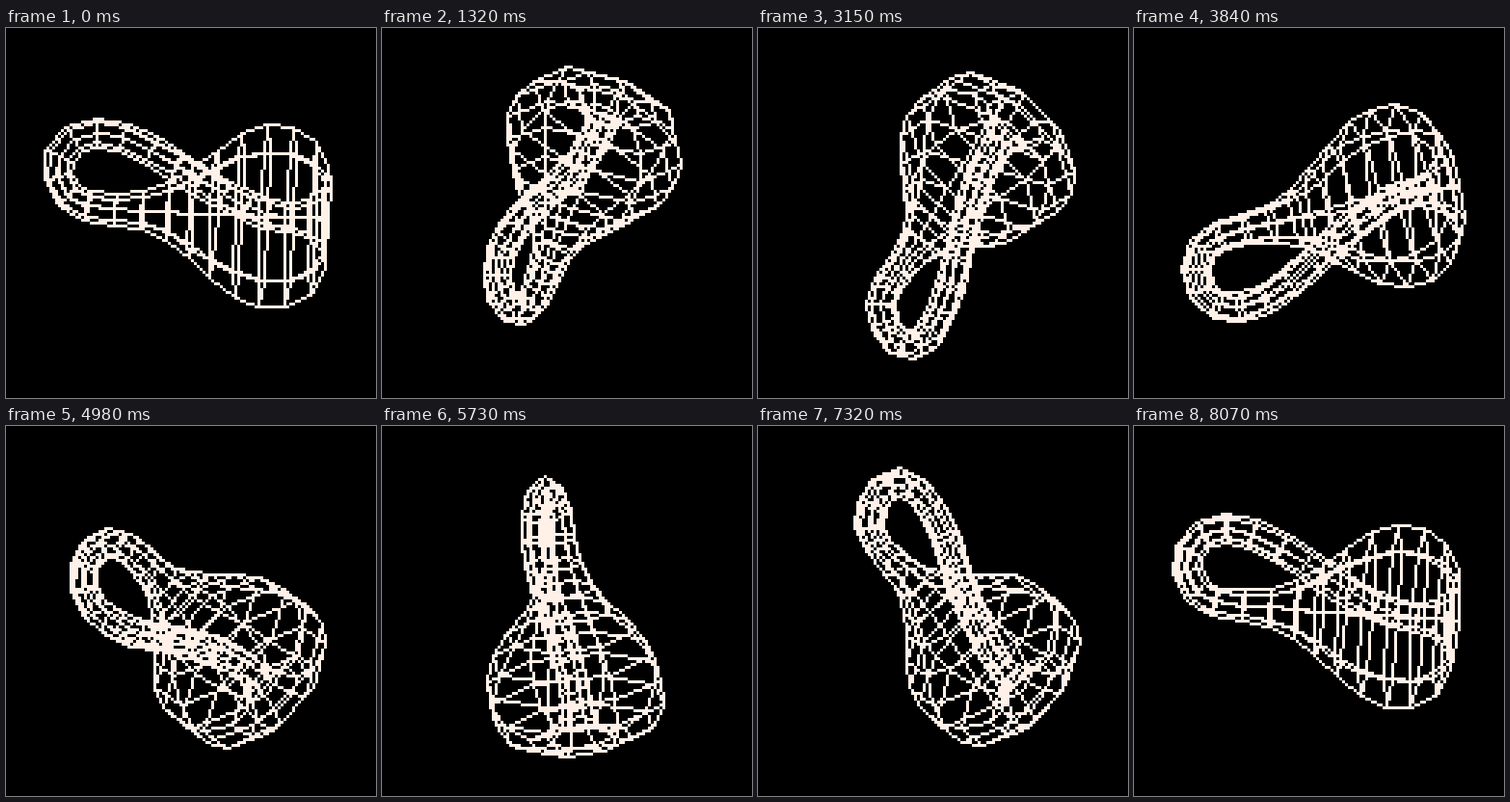
Animation of 384 by 384 pixels, one loop 8100 ms. Source, as an HTML page with a canvas:

```html
<!DOCTYPE html>
<html lang="en">
<head>
<meta charset="utf-8">
<title>Klein bottle</title>
<style>
html, body { margin: 0; width: 100%; height: 100%; overflow: hidden; background: #000; }
canvas { display: block; width: 384px; height: 384px; }
</style>
</head>
<body>
<canvas id="stage" width="384" height="384"></canvas>
<script>
const ctx = document.getElementById('stage').getContext('2d');
const CELL = 3, MID = 64, SIDES = 8;
const STEP = 30, STEPS = 270;

// Rings along the tube: x and y of the centre, radius.
const rings = [
  [138, 0, 34], [122, 0, 20], [103, 0, 15],
  [80, 3, 15], [58, 10, 15], [33, 21, 15], [8, 34, 15], [-17, 48, 15],
  [-44, 63, 15], [-74, 75, 15], [-102, 79, 15], [-125, 71, 15],
  [-139, 53, 15], [-140, 31, 15], [-128, 11, 15], [-108, 2, 15],
  [-79, 0, 16], [-51, 0, 20], [-24, 0, 31], [0, 0, 47], [24, 0, 67],
  [50, 0, 85], [76, 0, 94], [103, 0, 94], [127, 0, 80], [141, 0, 53]
];
const last = rings.length - 1;

const mesh = rings.map(([x, y, r], i) => {
  const a = rings[Math.max(i - 1, 0)], b = rings[Math.min(i + 1, last)];
  const dx = b[0] - a[0], dy = b[1] - a[1], len = Math.hypot(dx, dy);
  return Array.from({ length: SIDES }, (_, j) => {
    const v = j * 2 * Math.PI / SIDES, k = r * Math.cos(v) / len;
    return [x - dy * k, y + dx * k, r * Math.sin(v)];
  });
});

// Turn about z, then about y by the same angle; flat projection.
function project([x, y, z], c, s) {
  const px = (x * c - y * s) * c + z * s, py = x * s + y * c;
  return [Math.floor(MID + px / CELL), Math.floor(MID - py / CELL)];
}

function line([x0, y0], [x1, y1]) {
  const n = Math.max(Math.abs(x1 - x0), Math.abs(y1 - y0), 1);
  for (let i = 0; i <= n; i++) {
    const x = Math.round(x0 + (x1 - x0) * i / n);
    const y = Math.round(y0 + (y1 - y0) * i / n);
    ctx.fillRect(x * CELL, y * CELL, CELL, CELL);
  }
}

function draw(step) {
  const t = (step - 2) / STEPS * 2 * Math.PI;
  const c = Math.cos(t), s = Math.sin(t);
  const pts = mesh.map(ring => ring.map(p => project(p, c, s)));
  ctx.fillStyle = '#000';
  ctx.fillRect(0, 0, 384, 384);
  ctx.fillStyle = '#fff1e8';
  for (let i = 0; i <= last; i++) {
    for (let j = 0; j < SIDES; j++) {
      line(pts[i][j], pts[i][(j + 1) % SIDES]);
      // The two ends join mirrored.
      const next = i < last ? pts[i + 1][j] : pts[0][(SIDES * 1.5 - j) % SIDES];
      line(pts[i][j], next);
    }
  }
}

const start = performance.now();
let shown = -1;
function tick() {
  const step = Math.floor((performance.now() - start) / STEP) % STEPS;
  if (step !== shown) draw(shown = step);
  requestAnimationFrame(tick);
}
tick();
</script>
</body>
</html>
```
